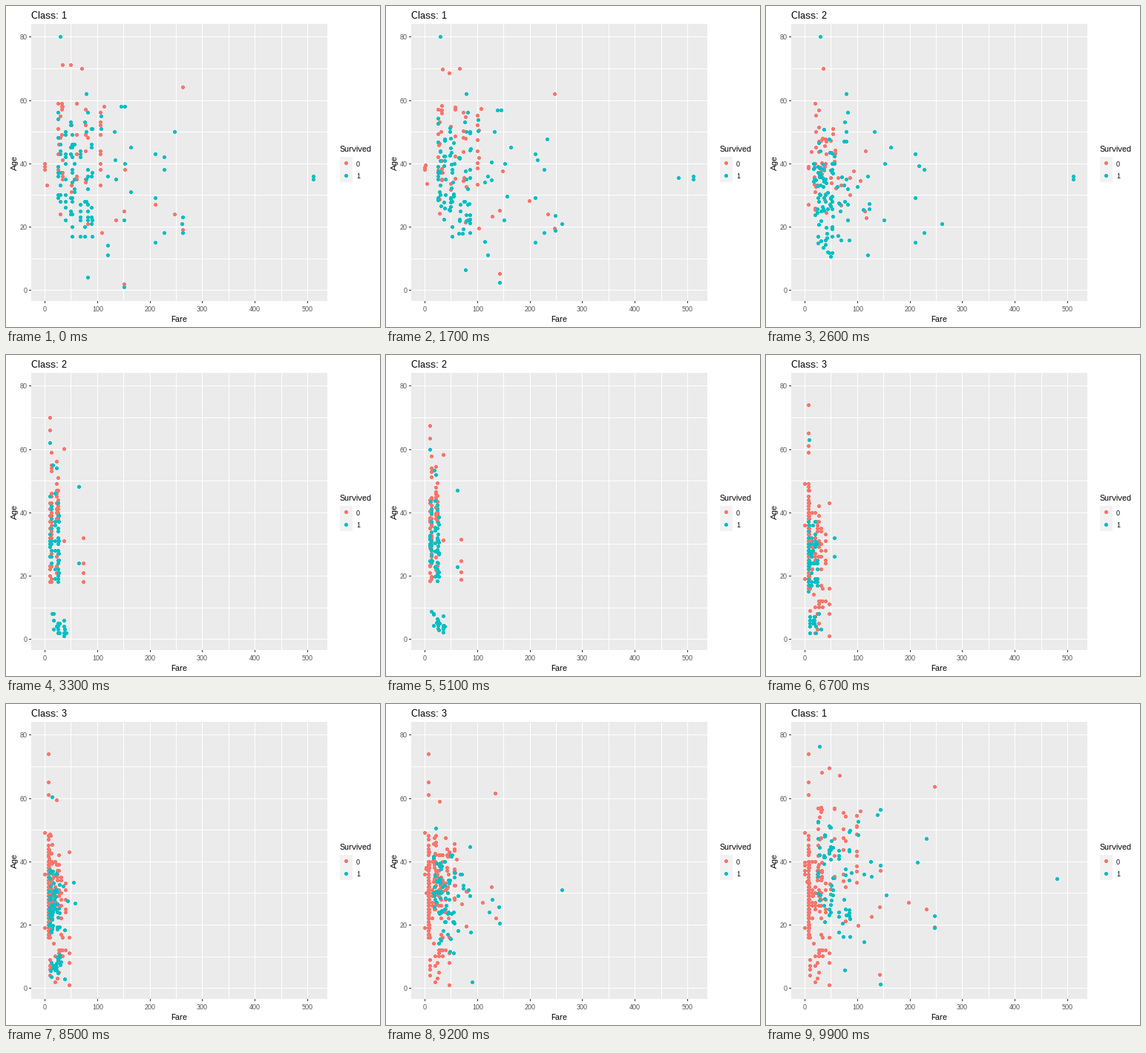
A matplotlib script that plays this animation: 504 by 432 pixels, repeating every 10 s.

```python
import numpy as np
import matplotlib.pyplot as plt
from matplotlib.animation import FuncAnimation
from matplotlib.colors import to_rgba
from matplotlib.patches import Rectangle

W, H, DPI = 504, 432, 72
RED, TEAL = to_rgba("#F8766D"), to_rgba("#00BFC4")
FRAMES, INTERVAL = 100, 100
MOVES = [(16, 33), (50, 67), (84, 100)]  # start and end of each transition

plt.rcParams["font.family"] = "Liberation Sans"
plt.rcParams["text.hinting"] = "native"
plt.rcParams["text.hinting_factor"] = 1
rng = np.random.default_rng(12)


def crowd(n, fares, low, mode, high):
    """Random passengers on a few common fares, with whole-year ages."""
    ages = np.round(rng.triangular(low, mode, high, n))
    return np.column_stack([rng.choice(fares, n), ages])


def join(total, first, last, *spread):
    """Key points at both ends and a crowd in between."""
    middle = crowd(total - len(first) - len(last), *spread)
    return np.vstack([first, middle, last])


def mixed(pts, pinned):
    return np.vstack([pts[:pinned], rng.permutation(pts[pinned:])])


# First class; the last survivors are those without a partner in second class
cabin = [26.5, 26.5, 30.5, 39.5, 49.5, 52.5, 57, 69, 77, 79.5, 83, 90, 91, 108]
lost1 = join(
    64,
    [(71, 70), (263, 64), (263, 19), (247.5, 24), (211.5, 27), (153.5, 38),
     (151.6, 25), (151.6, 2), (135.6, 22), (113.3, 58), (109, 18)],
    [(34.7, 71), (49.5, 71), (0, 40), (0, 39), (0, 38), (5, 33)],
    [26.5, 26.5, 27.7, 29.7, 30.6, 33, 35, 52, 61, 78, 83, 106], 19, 48, 66)
stay = join(
    79,
    [(512.3, 35), (263, 23), (263, 18), (247.5, 50), (227.5, 42), (165, 31),
     (153.5, 58), (146.5, 58), (151.6, 1), (134.5, 41), (135.6, 35), (82, 4)],
    [(120, 36), (120, 14)], cabin, 14, 34, 64)
leave = join(
    43, [(153.5, 40), (30, 80)],
    [(512.3, 36), (512.3, 35), (262.4, 21), (227.5, 38), (227.5, 18),
     (211.3, 43), (211.3, 29), (211.3, 15), (164.9, 45), (151.6, 22),
     (133.7, 50), (120, 36), (120, 11), (80, 62), (83, 56)],
    cabin[:-3], 15, 34, 57)

# Second class
lost2 = mixed(join(
    90, [(10.5, 70), (13, 30)],
    [(10.5, 66), (13, 59), (37.5, 60), (37.5, 31), (73.5, 32), (73.5, 24),
     (73.5, 21), (73.5, 18)],
    [10.5, 10.5, 13, 13, 13, 26, 26, 23], 15, 27, 58), 2)
young2 = crowd(20, [14, 18, 23, 26, 26, 29, 33, 37, 39, 41], 0.6, 2, 9)
saved2 = mixed(join(
    79, [(13, 42)],
    np.vstack([[(10.5, 62), (16, 55), (23, 54), (65, 48), (65, 24)], young2]),
    [10.5, 13, 13, 21, 26, 26, 28], 16, 30, 49), 1)

# Third class; unmatched passengers come last and stay in place
steerage = [7.05, 7.25, 7.75, 7.9, 7.9, 8.05, 8.05, 8.7, 9.5]
young3 = crowd(26, [10, 18, 21, 25, 28, 28, 31, 31, 34, 40, 47], 1, 9, 18)
adults3 = crowd(45, [14.5, 16, 18, 20.5, 24, 28, 31, 40], 20, 30, 43)
lost3 = join(
    270, [(8, 25), (7, 59), (7.8, 25), (8, 40)],
    np.vstack([[(7.2, 74), (7.2, 65), (7, 61), (0, 49), (0, 36), (0, 19),
                (47, 43), (47, 1)], young3, adults3]),
    steerage, 15, 21, 51)
saved3 = mixed(join(
    81, [(12.5, 27)],
    np.vstack([[(9.6, 63), (56.5, 32), (56.5, 26)],
               crowd(18, [11, 16, 19, 22, 27, 31], 0.6, 4, 9)]),
    [7.2, 7.8, 7.9, 9.5, 13, 15.5, 20, 24], 14, 24, 40), 1)

LOST = [lost1, lost2, lost3]
SAVED = [np.vstack([stay, leave]), saved2, saved3]


def px(fare):
    return 52.1 + 0.7083 * fare


def py(age):
    return 382.6 - 4.263 * age


fig = plt.figure(figsize=(W / DPI, H / DPI), dpi=DPI, facecolor="white")
ax = fig.add_axes([0, 0, 1, 1])
ax.set(xlim=(0, W), ylim=(H, 0))
ax.axis("off")


def box(x, y, w, h, color):
    ax.add_patch(Rectangle((x, y), w, h, fc=color, lw=0, antialiased=False))


def label(x, y, text, size, color="black", **kw):
    return ax.text(x, y, text, fontsize=size, color=color, **kw)


box(34, 24, 399, 373, "#EBEBEB")
for fare in range(0, 501, 50):
    x = int(px(fare) + 0.25)
    box(x, 24, 1, 373, "white")
    if fare % 100 == 0:
        box(x, 397, 1, 3, "#333333")
        label(x + 0.5, 411, str(fare), 9, "#4D4D4D", ha="center")
for age in range(0, 81, 10):
    y = round(py(age) - 0.3)
    box(34, y, 399, 1, "white")
    if age % 20 == 0:
        box(31, y, 3, 1, "#333333")
        label(29, y + 4, str(age), 9, "#4D4D4D", ha="right")

title = label(34, 17, "", 13)
label(233, 425, "Fare", 11, ha="center")
label(12, 211, "Age", 11, ha="center", va="center", rotation=90)
label(450, 196, "Survived", 11)
box(450, 203, 17, 34, "#F2F2F2")
KEY = np.array([(458.5, 211.5), (458.5, 228.5)])
for text, (_, y) in zip("01", KEY):
    label(472, y + 4, text, 9)

diamond = [(0, -1), (1, 0), (0, 1), (-1, 0)]
dots = ax.scatter(*KEY.T, s=25, marker=diamond, c=[RED, TEAL], lw=0,
                  antialiased=False, zorder=4)


def blend(a, b, t):
    """Pairs move in a straight line; surplus points of a wait until the end."""
    n = min(len(a), len(b))
    return np.vstack([a[:n] + (b[:n] - a[:n]) * t, a[n:]])


def draw(i):
    state, t, shown = 0, 0.0, 0
    for k, (start, end) in enumerate(MOVES):
        if i >= end:
            state = shown = k + 1
        elif i > start:
            t = (i - start) / (end - start)
            shown = k + (i - start >= 10)
    title.set_text(f"Class: {shown % 3 + 1}")
    red, teal = (blend(g[state], g[(state + 1) % 3], t) if t else g[state]
                 for g in (LOST, SAVED))
    pts = np.vstack([red, teal])
    xy = np.column_stack([px(pts[:, 0]), py(pts[:, 1])])
    dots.set_offsets(np.vstack([KEY, np.floor(xy) + 0.5]))
    dots.set_facecolors([RED, TEAL] + [RED] * len(red) + [TEAL] * len(teal))
    return title, dots


def reset():
    return draw(0)


anim = FuncAnimation(fig, draw, frames=FRAMES, init_func=reset,
                     interval=INTERVAL, repeat=True, repeat_delay=0, blit=False)
plt.show()
```
